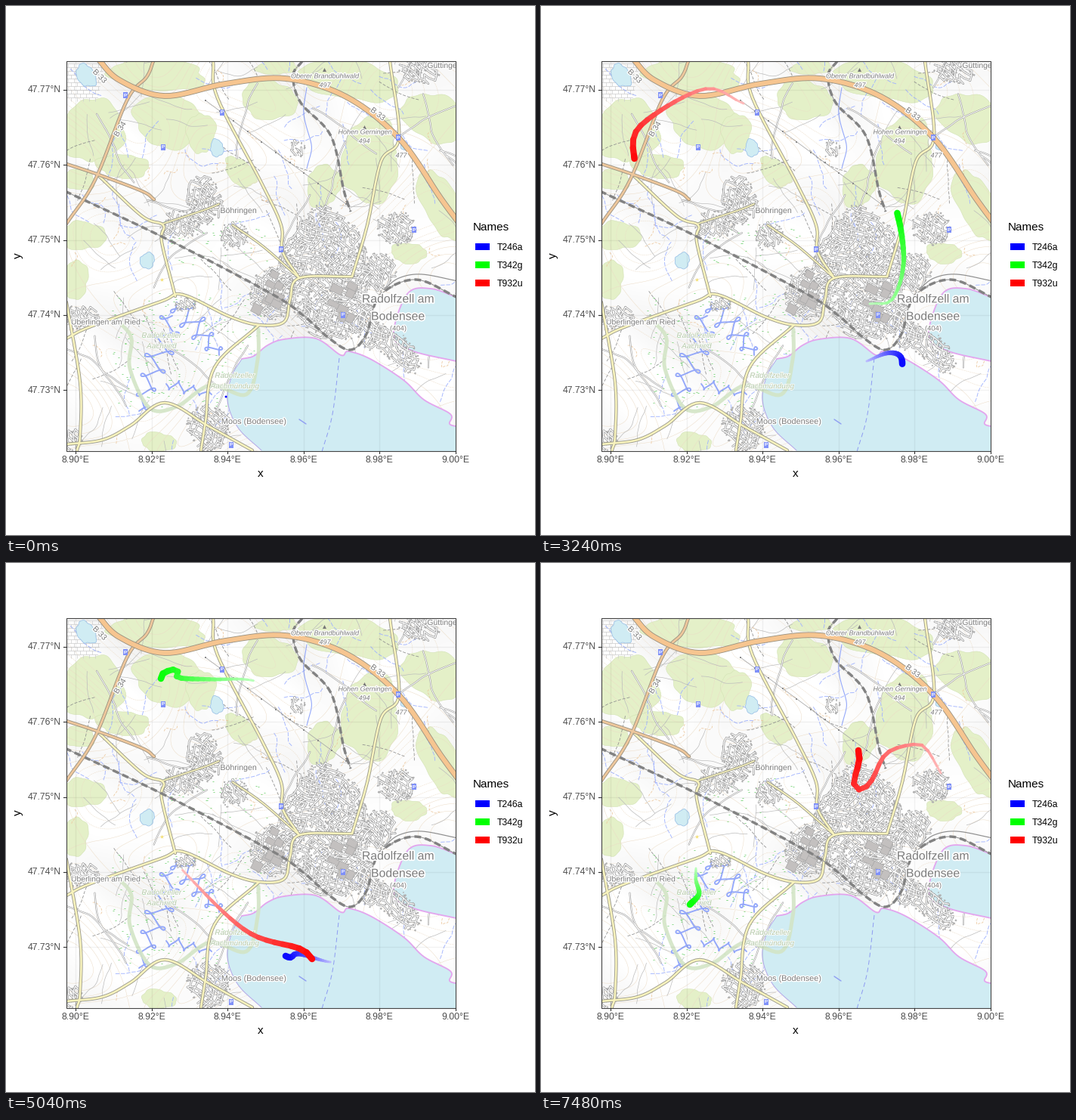
A matplotlib script for the animation above (7.52 s loop, 700 px wide and 700 px high).

```python
import numpy as np
import matplotlib.pyplot as plt
from matplotlib.animation import FuncAnimation
from matplotlib.collections import LineCollection
from matplotlib.patches import Polygon, Rectangle
from matplotlib.path import Path
import matplotlib.patheffects as fx

SIZE, FRAMES, INTERVAL, TAIL = 700, 188, 40, 20
PT = 0.72  # points per pixel at 100 dpi
L, R, T, B = 79.5, 595, 73, 588.5
plt.rcParams["font.family"] = "Liberation Sans"
rng = np.random.default_rng(7)

fig = plt.figure(figsize=(7, 7), dpi=100, facecolor="white")


def pixel_axes(x0, x1, y0, y1):
    ax = fig.add_axes([x0 / SIZE, 1 - y1 / SIZE, (x1 - x0) / SIZE, (y1 - y0) / SIZE])
    ax.set(xlim=(x0, x1), ylim=(y1, y0), autoscale_on=False)
    ax.axis("off")
    return ax


page = pixel_axes(0, SIZE, 0, SIZE)
land = pixel_axes(L, R, T, B)


def smooth(pts, n=10):
    """Catmull-Rom curve through the points."""
    p = np.array(pts, float)
    p = np.vstack([2 * p[0] - p[1], p, 2 * p[-1] - p[-2]])
    t = np.linspace(0, 1, n, endpoint=False)[:, None]
    out = []
    for a, b, c, d in zip(p, p[1:], p[2:], p[3:]):
        out.append(b + 0.5 * t * (c - a + t * (2 * a - 5 * b + 4 * c - d
                                               + t * (3 * (b - c) + d - a))))
    return np.vstack(out + [p[-2:-1]])


def turned(u, v, degrees):
    a = np.radians(degrees)
    return np.stack([u * np.cos(a) - v * np.sin(a), u * np.sin(a) + v * np.cos(a)], -1)


def blob(x, y, rx, ry, tilt=0, rough=0.12):
    """Ellipse with a seeded ragged outline."""
    t = np.linspace(0, 2 * np.pi, 90)
    r = 1 + sum(rough / k ** 0.6 * np.sin(k * t + rng.uniform(0, 7)) for k in (2, 3, 5, 9))
    return turned(rx * r * np.cos(t), ry * r * np.sin(t), tilt) + (x, y)


def meander(start, end, waves, amp):
    """Looping river: across-swing plus a double-speed swing along the way."""
    t = np.linspace(0, 1, 30 * waves)
    step = np.subtract(end, start)
    side = np.array([-step[1], step[0]]) / np.hypot(*step)
    phase = 2 * np.pi * waves * t
    swing = amp * (1 + 0.3 * np.sin(5 * t)) * np.sin(phase)
    lead = 0.35 * amp * np.sin(2 * phase)
    return (start + t[:, None] * step + swing[:, None] * side
            + lead[:, None] * step / np.hypot(*step))


def walks(count, steps, step, turn):
    for _ in range(count):
        angle = rng.uniform(0, 2 * np.pi) + np.cumsum(rng.normal(0, turn, steps))
        move = step * np.c_[np.cos(angle), np.sin(angle)]
        yield smooth(rng.uniform((L, T), (R, B)) + np.cumsum(move, axis=0), 5)


def line(pts, color, width, z, **kw):
    land.plot(*np.transpose(pts), color=color, lw=width * PT, zorder=z,
              solid_capstyle="round", **kw)


def road(pts, fill="#f8f3bd", width=2.6, edge="#98978a", z=8):
    curve = smooth(pts)
    line(curve, edge, width + 1.7, z)
    line(curve, fill, width, z + 0.4)


def rail(pts):
    curve = smooth(pts)
    line(curve, "#9a9a9a", 1.2, 8.6)
    line(curve, "#828282", 3.4, 8.7, dashes=(2.6, 1.5), dash_capstyle="butt")


def town(x, y, rx, ry, tilt=0, step=8, density=0.06):
    edge = blob(x, y, rx, ry, tilt, 0.07)
    shape = Path(edge)
    n = int(max(rx, ry) * 1.5 / step) + 2
    i, j = np.mgrid[-n:n + 1, -n:n + 1]
    grid = turned(i * step + 3 * np.sin(j * 0.9), j * step * 0.85 + 3 * np.sin(i * 0.7), 28)
    grid += (x, y) + rng.normal(0, 0.8, grid.shape)
    inside = shape.contains_points(grid.reshape(-1, 2)).reshape(i.shape)
    segs = []
    for a, b in ((np.s_[1:], np.s_[:-1]), (np.s_[:, 1:], np.s_[:, :-1])):
        ok = inside[a] & inside[b] & (rng.random(inside[a].shape) < 0.8)
        segs += list(np.stack([grid[a][ok], grid[b][ok]], 1))
    for color, width, z in (("#949494", 2.6, 6.2), ("#fcfcfc", 1.3, 6.4)):
        land.add_collection(LineCollection(segs, colors=color, linewidths=width * PT,
                                           zorder=z, capstyle="round"))
    lo, hi = edge.min(axis=0), edge.max(axis=0)
    spots = rng.uniform(lo, hi, (int(np.prod(hi - lo) * density), 2))
    spots = spots[shape.contains_points(spots)]
    land.scatter(*spots.T, s=rng.uniform(2, 6, len(spots)), marker=(4, 0, 17),
                 color="#b0b0b0", lw=0, zorder=6.1)


def label(x, y, text, size, color="#7c7c7c", halo=2.6, **kw):
    land.text(x, y, text, fontsize=size * PT, color=color, ha="center", va="center",
              zorder=12, clip_on=True,
              path_effects=[fx.withStroke(linewidth=halo * PT, foreground="white")], **kw)


# Relief and contours
X, Y = np.meshgrid(np.linspace(L, R, 200), np.linspace(T, B, 200))
relief = np.sin(X / 31 + 1.3 * np.sin(Y / 47)) + np.sin(Y / 27 + np.sin(X / 39))
slope_y, slope_x = np.gradient(relief)
land.imshow(slope_y - slope_x, cmap="gray", extent=(L, R, B, T), vmin=-8, vmax=0.1,
            aspect="auto", zorder=0)
land.contour(X, Y, relief, levels=8, colors="#ecdcc6", linewidths=0.35, zorder=2)

# Woods: centre, radii, tilt
for wood in ((200, 90, 68, 21, 5), (114, 165, 40, 44), (214, 152, 46, 34), (258, 168, 18, 28),
             (95, 230, 22, 14), (102, 304, 28, 20), (155, 212, 34, 16), (92, 362, 18, 24),
             (348, 124, 36, 27), (358, 81, 26, 10), (455, 98, 62, 28, 10), (482, 204, 40, 54),
             (566, 148, 44, 30, 35), (574, 262, 22, 50, -20), (533, 327, 24, 13),
             (310, 220, 26, 14, 50), (420, 238, 22, 28), (202, 577, 22, 13)):
    land.add_patch(Polygon(blob(*wood), fc="#e4f0c8", ec="#d3e3b4", lw=0.4, zorder=1))

# Suburb grid in the north-west corner
for k in range(10):
    y = 76 + 5 * k
    land.plot([80, 130 - k], [y, y], color="#cccccc", lw=0.5, zorder=2)
    land.vlines(np.arange(82 + 4 * (k % 2), 129 - k, 8), y, y + 5, color="#cccccc", lw=0.5,
                zorder=2)

# Streams, field paths, lanes and marsh
for w in walks(60, 9, 7, 0.28):
    line(w, "#a3b5ff", 0.9, 3, dashes=(6, 2))
for w in walks(90, 8, 8, 0.16):
    line(w, "#bcbcbc", 0.7, 3)
for w in walks(34, 7, 10, 0.1):
    line(w, "#8f8f8f", 0.8, 3, dashes=(5, 2.5))
for w in walks(36, 7, 4, 0.5):
    line(w, "#edc9a0", 0.8, 3, dashes=(4, 2))
for w in walks(22, 9, 13, 0.15):
    line(w, "#9a9a9a", 2.1, 4)
    line(w, "white", 1, 4.1)
for lo, hi, count in (((140, 380), (345, 530), 230), ((205, 285), (350, 345), 45)):
    land.scatter(*rng.uniform(lo, hi, (count, 2)).T, s=3, marker="_", color="#86d886", lw=0.7,
                 zorder=4)

# Lake, bay and ponds
WATER, SHORE = "#d0ecf3", "#e3a5ee"
west = smooth([(338, 588), (307, 558), (293, 522), (299, 489), (312, 467)])
north = smooth([(312, 467), (328, 463), (346, 449), (368, 441), (410, 440), (443, 462),
                (453, 457), (482, 467), (526, 495), (553, 521), (588, 540), (587, 553),
                (600, 557)])
bay = smooth([(600, 387), (562, 374), (531, 381), (513, 435), (537, 456), (600, 471)])
land.add_patch(Polygon(np.vstack([west, north, [(600, 600), (338, 600)]]), fc=WATER, zorder=5))
land.add_patch(Polygon(bay, fc=WATER, zorder=5))
line(west, "#b3a9e8", 1, 5.2)
for coast in (north, bay):
    line(coast, SHORE, 1.8, 5.2)
for pond in ((106, 92, 11, 17, -25), (279, 188, 9, 11), (187, 337, 10, 10), (526, 186, 4, 4)):
    land.add_patch(Polygon(blob(*pond), fc=WATER, ec="#9fc4e8", lw=0.6, zorder=5))

# Grid lines
for k in range(5):
    land.axhline(111 + 99.3 * k, color="black", alpha=0.05, lw=1, zorder=5.5)
    land.axvline(92 + 100.6 * k, color="black", alpha=0.05, lw=1, zorder=5.5)

# Rivers and the reserve border
for bends in (((226, 392), (282, 462), 4, 13), ((220, 410), (176, 536), 5, 14),
              ((212, 500), (272, 514), 3, 6)):
    line(meander(*bends), "#94a8fa", 1.9, 4.5)
line(meander((398, 215), (398, 108), 1, 5), "#94a8fa", 1.1, 4.5)
line(smooth([(150, 418), (166, 440), (164, 480), (190, 532), (226, 530), (270, 502), (318, 514),
             (333, 468), (334, 428)]), "#d3e5c6", 5, 5.3, alpha=0.9)

# Towns: centre, radii, tilt
for place in ((425, 356, 58, 92, -14), (352, 380, 30, 36), (516, 452, 46, 18, 45),
              (494, 352, 24, 26), (516, 294, 28, 22), (232, 290, 28, 20), (262, 258, 24, 34),
              (302, 305, 20, 20), (268, 558, 29, 31), (98, 412, 25, 17), (88, 574, 14, 16),
              (548, 86, 28, 18), (237, 395, 14, 10), (385, 190, 11, 13), (480, 425, 14, 32)):
    town(*place)
for cx, cy, spread, count in ((348, 378, 18, 9), (448, 388, 17, 8)):
    for x, y in rng.uniform((cx - spread, cy - 1.5 * spread), (cx + spread, cy + 1.5 * spread),
                            (count, 2)):
        land.add_patch(Rectangle((x - 6, y - 5), rng.uniform(9, 17), rng.uniform(7, 12), angle=26,
                                 fc="#c3c0bf", ec="#a8a8a8", lw=0.5, zorder=6.6))

# Power line
line([(264, 125), (450, 262)], "#a8a8a8", 0.8, 7)
land.scatter(np.linspace(264, 450, 11), np.linspace(125, 262, 11), s=3, marker="s",
             color="#8a8a8a", lw=0, zorder=7)

# Roads
road([(80, 580), (128, 574), (165, 555), (210, 525), (268, 556), (326, 588)])
road([(94, 588), (98, 568), (98, 498), (80, 392)])
road([(80, 440), (110, 425), (205, 391), (234, 382), (296, 411), (335, 422), (368, 418),
      (376, 388), (388, 360), (458, 358)])
road([(122, 224), (180, 278), (208, 290), (206, 312), (224, 384)])
road([(208, 288), (262, 270), (282, 262)], width=1.6)
road([(274, 73), (280, 122), (338, 234), (364, 290), (366, 325), (388, 360)])
road([(388, 360), (340, 318), (300, 290)], width=1.8)
road([(458, 358), (478, 290), (496, 206), (520, 174), (508, 73)])
road([(335, 422), (276, 478), (264, 550), (258, 588)])
RIM = "#99907f"
road([(195, 73), (186, 94), (160, 125), (118, 230), (80, 288)], "#eec79c", 2.8, RIM, 9)
road([(80, 209), (122, 223), (180, 245), (196, 256)], "#eec79c", 2.8, RIM, 9)
road([(120, 68), (150, 98), (210, 119), (290, 103), (370, 96), (450, 120), (520, 175),
      (575, 254), (600, 288)], "#f6c590", 6, RIM, 9.5)

# Railways
rail([(78, 245), (208, 306), (350, 380), (394, 410), (428, 440), (456, 455), (477, 434),
      (494, 384), (542, 362), (598, 386)])
rail([(392, 73), (380, 92), (390, 128), (430, 172), (447, 244), (456, 272)])
line(smooth([(500, 375), (520, 360), (550, 355), (598, 364)]), "#8f8f8f", 1.2, 8)

# Ferry
line(smooth([(441, 466), (432, 540), (418, 590)]), "#8f9df2", 1, 8, dashes=(6, 4))
line([(388, 547), (397, 553)], "#8f9df2", 1.4, 8)

# Symbols
for x, y in ((158, 118), (208, 187), (286, 141), (364, 322), (519, 174), (540, 296),
             (446, 409), (298, 581)):
    land.add_patch(Rectangle((x - 3, y - 4), 6, 8, fc="#7f90f8", lw=0, zorder=11))
    land.text(x, y, "P", fontsize=6.5 * PT, color="white", weight="bold", ha="center",
              va="center", zorder=11.5)
land.scatter([421, 474], [84, 160], s=13, marker="^", color="#777777", lw=0, zorder=11)
land.scatter([206], [362], s=16, marker="*", color="#f3df70", lw=0, zorder=11)

# Place names
label(518.5, 388, "Radolfzell am", 15.8, halo=3.4)
label(518.5, 411, "Bodensee", 15.8, halo=3.4)
label(519, 427, "(404)", 9.4)
label(308, 271, "Böhringen", 10.6)
label(328, 550, "Moos (Bodensee)", 10.9)
label(132, 418, "Überlingen am Ried", 10.4)
label(580, 79, "Güttingen", 10.4)
for x, y, text in ((422, 93, "Oberer Brandbühlwald"), (422, 105, "497"),
                   (475, 167, "Hohen Gerningen"), (474, 179, "494"), (523, 198, "477")):
    label(x, y, text, 9, style="italic")
for x, y, text in ((206, 436, "Radolfzeller"), (206, 450, "Aachried"),
                   (303, 489, "Radolfzeller"), (303, 503, "Aachmündung")):
    label(x, y, text, 10, "#b4c8a8", 1.5, style="italic")
for x, y, text, turn in ((124, 93, "B 33", -45), (492, 143, "B 33", -38), (151, 163, "B 34", 58)):
    label(x, y, text, 10.5, rotation=turn)

# Frame, axes and legend
page.set_zorder(2)
page.add_patch(Rectangle((L, T), R - L, B - T, fill=False, ec="#444444", lw=0.8))
for k in range(6):
    x = 92 + 100.55 * k
    page.plot([x, x], [B, B + 3.8], color="#333333", lw=0.8)
    page.text(x, 600.5, f"{8.9 + 0.02 * k:.2f}°E", fontsize=8.8, color="#4d4d4d",
              ha="center", va="center")
for k in range(5):
    y = 111 + 99.3 * k
    page.plot([L - 3.8, L], [y, y], color="#333333", lw=0.8)
    page.text(72.7, y + 0.5, f"{47.77 - 0.01 * k:.2f}°N", fontsize=8.8, color="#4d4d4d",
              ha="right", va="center")
page.text(337, 619, "x", fontsize=11, ha="center", va="center")
page.text(16, 330.5, "y", fontsize=11, ha="center", va="center", rotation=90)
page.text(618, 297, "Names", fontsize=11, va="baseline")
COLORS = {"T246a": (0, 0, 1), "T342g": (0, 1, 0), "T932u": (1, 0, 0)}
for k, (name, color) in enumerate(COLORS.items()):
    y = 318.5 + 24 * k
    page.add_patch(Rectangle((621, y - 4.5), 19, 9, fc=color, lw=0))
    page.text(650, y + 4.5, name, fontsize=8.8, va="baseline")

# Render the still map once, then reuse it as a backdrop
fig.canvas.draw()
still = np.asarray(fig.canvas.buffer_rgba()).copy()
fig.clear()
stage = pixel_axes(0, SIZE, 0, SIZE)
stage.imshow(still, extent=(0, SIZE, SIZE, 0), interpolation="nearest", aspect="auto")


def track(now, here, *legs):
    """Even speed along each leg; a leg is its end time and its further points."""
    first, spots = now, [[here]]
    for end, *pts in legs:
        path = smooth([here] + pts)
        dist = np.r_[0, np.cumsum(np.hypot(*np.diff(path, axis=0).T))]
        at = np.linspace(0, dist[-1], end - now + 1)[1:]
        spots.append(np.c_[np.interp(at, dist, path[:, 0]), np.interp(at, dist, path[:, 1])])
        now, here = end, pts[-1]
    return first, np.vstack(spots)


blue = track(
    0, (291, 517),
    (34, (293, 500), (305, 482), (317, 474), (333, 463), (350, 462)),
    (62, (377, 472), (389, 462), (405, 468), (424, 465), (431, 470)),
    (100, (460, 459), (477, 466), (475, 495), (464, 514), (451, 521)),
    (126, (429, 528), (388, 517), (377, 522), (370, 520)),
    (153, (354, 519), (330, 519), (313, 510), (298, 514), (291, 517)))
green = track(
    15, (178, 447),
    (34, (188, 418), (212, 411), (227, 383), (231, 360), (250, 341)),
    (62, (275, 327), (305, 329), (361, 353), (381, 373), (435, 394)),
    (100, (465, 388), (480, 335), (467, 260), (440, 235), (420, 193), (400, 177), (376, 172)),
    (126, (324, 155), (275, 154), (229, 152), (228, 144), (221, 141), (208, 146), (205, 153)),
    (150, (212, 190), (184, 230), (173, 250), (196, 276), (208, 280)),
    (168, (214, 310), (204, 375), (205, 404)),
    (187, (205, 420), (209, 438), (197, 452)))
red = track(
    43, (413, 237),
    (62, (362, 225), (336, 204), (325, 178), (290, 138), (268, 129)),
    (100, (215, 110), (130, 160), (124, 205), (125, 188), (133, 188), (139, 212), (124, 243),
     (128, 255), (163, 284), (183, 346)),
    (126, (237, 410), (318, 487), (388, 510), (405, 524)),
    (150, (453, 528), (478, 505), (478, 480), (471, 478), (460, 499), (448, 496), (445, 472),
     (459, 415), (442, 400), (454, 399)),
    (168, (500, 388), (540, 330), (529, 278)),
    (187, (510, 246), (493, 240), (457, 252), (438, 287), (424, 300), (414, 292), (421, 262),
     (420, 248)))

trails = []
for (first, spots), color in zip((blue, green, red), COLORS.values()):
    tail = LineCollection([], capstyle="round", zorder=3)
    stage.add_collection(tail, autolim=False)
    trails.append((tail, first, spots, np.array(color, float)))


def update(frame):
    for tail, first, spots, color in trails:
        k = frame - first
        if not 0 <= k < len(spots):
            tail.set_segments([])
            continue
        pts = spots[max(0, k - TAIL + 1):k + 1]
        if len(pts) == 1:
            tail.set_segments([[pts[0], pts[0] + 0.1]])
            tail.set(color=[color], linewidth=[2.13])
            continue
        t = np.arange(len(pts) - 1)[:, None] / (len(pts) - 1)
        tint = 0.27 + 0.73 * t
        tail.set_segments(np.stack([pts[:-1], pts[1:]], 1))
        tail.set(color=1 - tint * (1 - color), linewidth=2.13 + 4.27 * t[:, 0])
    return [trail[0] for trail in trails]


anim = FuncAnimation(fig, update, frames=FRAMES, interval=INTERVAL, repeat=True,
                     repeat_delay=0, blit=False)
plt.show()
```
